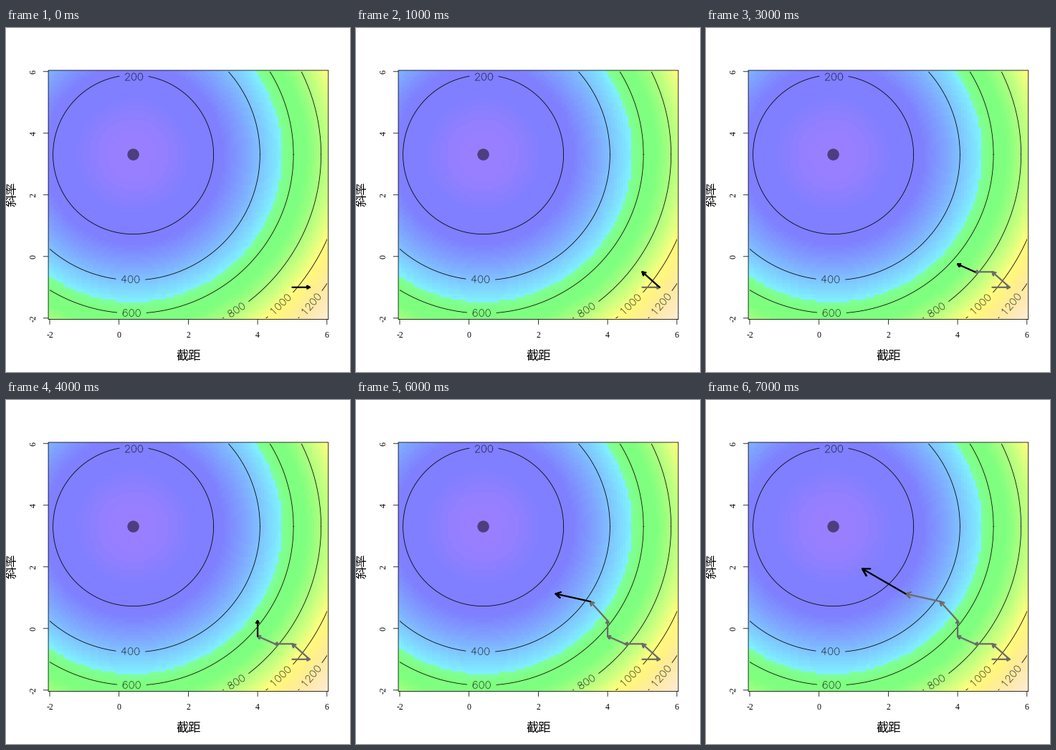
Write a matplotlib script that moves like this. It is 480 by 480 pixels and loops after 8000 ms.

```python
import colorsys

import matplotlib.pyplot as plt
import numpy as np
from matplotlib.animation import FuncAnimation
from matplotlib.patches import Circle, Rectangle

plt.rcParams["path.snap"] = False

SIZE, DPI = 480, 100
PT = 72 / DPI  # points per pixel
THIN, THICK = 0.8 * PT, 2.25 * PT
LEFT, RIGHT, TOP, BOTTOM = 59.04, 449.76, 59.04, 406.56
CELLS = 100
PAD = 4 / (CELLS - 1)  # half a cell, in data units
CX, CY = 177.6, 176.6  # minimum of the loss surface, in pixels
AX, AY, BASE = 93.5, 91.9, 65.8

PATH = [(5, -1), (5.5, -1), (5, -0.5), (4.5, -0.5), (4, -0.25),
        (4, 0.25), (3.5, 0.875), (2.5, 1.125), (1.25, 1.9375)]

# level: label centre in pixels
LABELS = {200: (178.5, 68), 400: (173.7, 350.5), 600: (175.2, 397.5),
          800: (321.3, 393.3), 1000: (382.8, 385.6), 1200: (425.5, 385.3)}


def to_px(x, y):
    span = 8 + 2 * PAD
    return (LEFT + (x + 2 + PAD) / span * (RIGHT - LEFT),
            BOTTOM - (y + 2 + PAD) / span * (BOTTOM - TOP))


def loss(px, py):
    return (px - CX) ** 2 / AX + (py - CY) ** 2 / AY + BASE


def topo_colors(n=100, alpha=0.5):
    k = n // 3
    hsv = [(h / 60, 1, 1) for h in np.linspace(43, 31, n - 2 * k)]
    hsv += [(h / 60, 1, 1) for h in np.linspace(23, 11, k)]
    hsv += [(h / 60, s, 1) for h, s in
            zip(np.linspace(10, 6, k), np.linspace(1, 0.3, k))]
    rgb = np.array([colorsys.hsv_to_rgb(*c) for c in hsv])
    # weak tints flatten into the pure hue
    rgb = np.clip(rgb - 0.15 * (1 - rgb), 0, 1)
    return alpha * rgb + 1 - alpha


def arc(cx, cy, rx, ry, start, end):
    t = np.radians(np.linspace(start, end, 40))
    return list(zip(cx + rx * np.cos(t), cy + ry * np.sin(t)))


# single-stroke digits in a 7 x 10 cell
DIGITS = {
    "0": [arc(3.5, 5, 3.3, 5, 0, 360)],
    "1": [[(1.8, 8), (3.8, 10), (3.8, 0)]],
    "2": [arc(3.4, 7.2, 2.9, 2.8, 170, -35) + [(0.3, 0), (6.8, 0)]],
    "4": [[(4.8, 0), (4.8, 10), (0, 3.3), (7, 3.3)]],
    "6": [arc(3.9, 4.6, 3.4, 5.4, 50, 180) + arc(3.6, 3.2, 3.1, 3.2, 180, 540)],
    "8": [arc(3.5, 7.7, 2.6, 2.3, 0, 360), arc(3.5, 2.8, 3.2, 2.8, 0, 360)],
}


def draw_label(text, cx, cy, angle):
    c, s = np.cos(angle), np.sin(angle)
    start = -(9 * len(text) - 2) / 2
    for i, digit in enumerate(text):
        for stroke in DIGITS[digit]:
            u, v = np.array(stroke).T
            u, v = u + start + 9 * i, v - 5
            ax.plot(cx + u * c - v * s, cy - u * s - v * c,
                    color="black", alpha=0.7, lw=THIN)


def draw_contour(level, lx, ly):
    t = np.linspace(0, 2 * np.pi, 2400)
    x = CX + np.sqrt((level - BASE) * AX) * np.cos(t)
    y = CY + np.sqrt((level - BASE) * AY) * np.sin(t)
    text = str(level)
    gap = 20.5 if len(text) == 3 else 24
    x[np.hypot(x - lx, y - ly) < gap] = np.nan
    line, = ax.plot(x, y, color="black", lw=THIN)
    x0, y0 = to_px(-2, 6)
    x1, y1 = to_px(6, -2)
    line.set_clip_path(Rectangle((x0, y0), x1 - x0, y1 - y0,
                                 transform=ax.transData))
    draw_label(text, lx, ly, np.arctan2((lx - CX) / AX, abs(ly - CY) / AY))


def draw_axes():
    style = dict(color="black", lw=THIN, solid_capstyle="butt")
    ax.add_patch(Rectangle((LEFT, TOP), RIGHT - LEFT, BOTTOM - TOP,
                           fill=False, ec="black", lw=THIN))
    text = dict(family="Liberation Serif", size=11.7 * PT,
                ha="center", va="center")
    for v in range(-2, 7, 2):
        x, y = to_px(v, v)
        ax.plot([x, x], [BOTTOM, BOTTOM + 7.2], **style)
        ax.plot([LEFT, LEFT - 7.2], [y, y], **style)
        ax.text(x, 429, str(v), **text)
        ax.text(38.5, y, str(v), rotation=90, **text)
    title = dict(family="Noto Sans CJK JP", size=17.3 * PT,
                 ha="center", va="center")
    ax.text(255, 457.7, "截距", **title)
    ax.text(8.8, 231.8, "斜率", rotation=90, **title)


def make_arrow(start, end):
    a, b = np.array(to_px(*start)), np.array(to_px(*end))
    back = 0.16 * (a - b)
    c, s = np.cos(np.pi / 6), np.sin(np.pi / 6)
    barbs = [b + np.array([[c, -k * s], [k * s, c]]) @ back for k in (1, -1)]
    x, y = np.array([a, b, barbs[0], b, barbs[1]]).T
    return ax.plot(x, y, lw=THICK, solid_capstyle="round",
                   solid_joinstyle="round", zorder=5)[0]


fig = plt.figure(figsize=(SIZE / DPI, SIZE / DPI), dpi=DPI, facecolor="white")
ax = fig.add_axes([0, 0, 1, 1])

xs = np.linspace(to_px(-2, 0)[0], to_px(6, 0)[0], CELLS)
ys = np.linspace(to_px(0, 6)[1], to_px(0, -2)[1], CELLS)
z = loss(*np.meshgrid(xs, ys))
bins = np.clip((z - z.min()) / np.ptp(z) * 100, 0, 99).astype(int)
ax.imshow(topo_colors()[bins], extent=(LEFT, RIGHT, BOTTOM, TOP),
          interpolation="nearest", aspect="auto")

ax.axis("off")
ax.set_autoscale_on(False)
ax.set_xlim(0, SIZE)
ax.set_ylim(SIZE, 0)

for level, centre in LABELS.items():
    draw_contour(level, *centre)
draw_axes()
ax.add_patch(Circle((CX, CY), 8.2, fc="black", ec="none", alpha=0.5, zorder=4))
arrows = [make_arrow(a, b) for a, b in zip(PATH, PATH[1:])]


def update(step):
    for i, arrow in enumerate(arrows):
        arrow.set_visible(i <= step)
        arrow.set_color("black" if i == step else "#6b6b6b")
    return arrows


anim = FuncAnimation(fig, update, frames=len(arrows), interval=1000,
                     repeat=True, repeat_delay=0)
plt.show()
```
